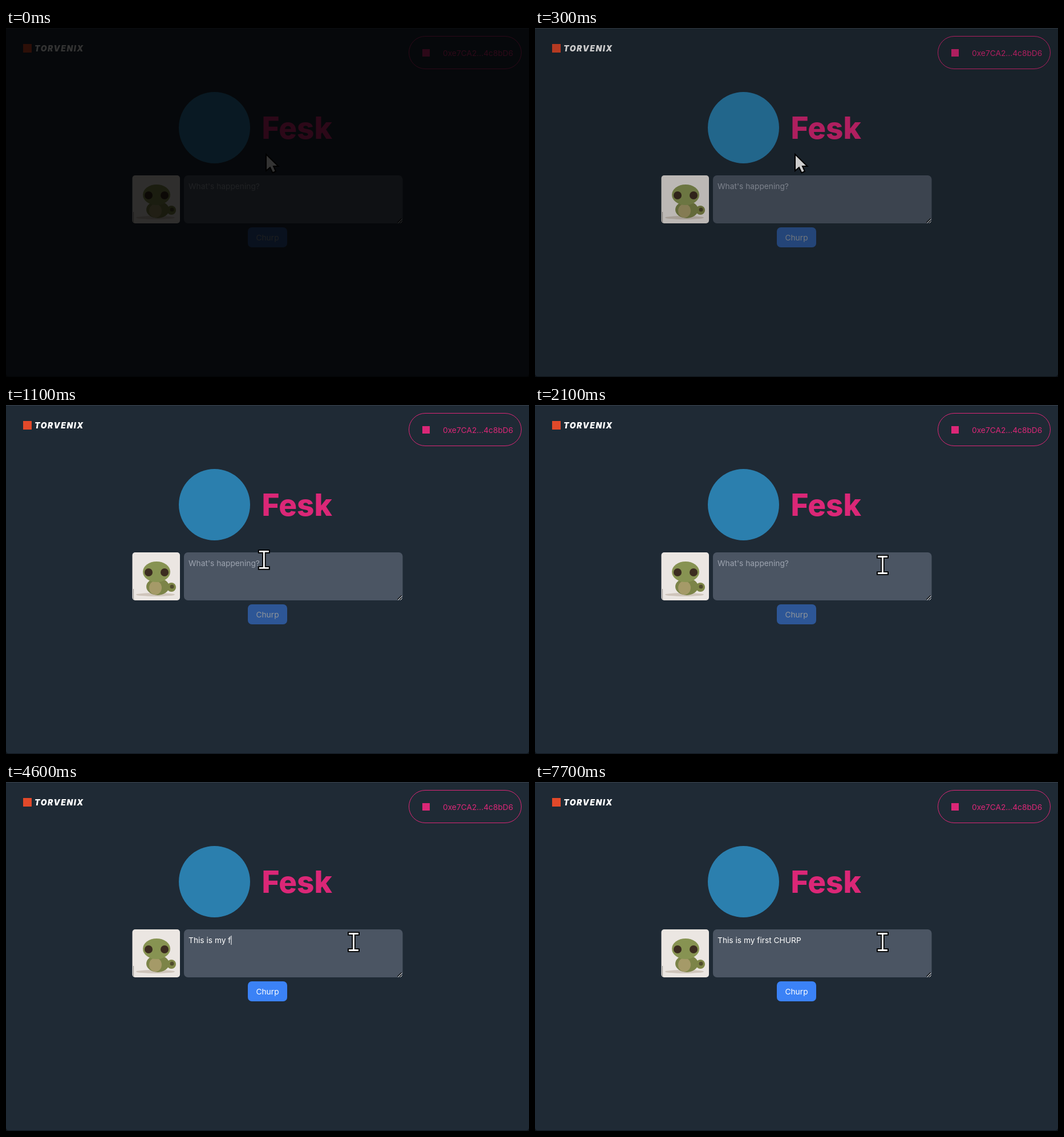
Write an HTML page that moves like this. It is 917 by 611 pixels and loops after 8000 ms.

```html
<!DOCTYPE html>
<html lang="en">
<head>
<meta charset="utf-8">
<title>Post composer</title>
<style>
  html, body { margin: 0; width: 100%; height: 100%; overflow: hidden; background: #000; }
  svg { display: block; width: 917px; height: 611px; font: 13.75px Inter, sans-serif; }
  text { white-space: pre; }
</style>
</head>
<body>
<svg viewBox="0 0 917 611">
  <rect width="917" height="611" fill="#0f151b"/>
  <path d="M0 0H917V605Q917 610 912 610H5Q0 610 0 605Z" fill="#1f2a35"/>
  <rect width="917" height="1" fill="#3b444e"/>

  <rect x="30" y="28" width="15" height="15" fill="#e2492a"/>
  <text x="50" y="41" fill="#fff" font-size="14" font-weight="900" font-style="italic" letter-spacing="1.5">TORVENIX</text>

  <rect x="706.5" y="14.5" width="197" height="57" rx="28.5" fill="none" stroke="#db2777"/>
  <rect x="730" y="37" width="13" height="13" fill="#db2777"/>
  <text x="766" y="48.5" fill="#db2777">0xe7CA2...4c8bD6</text>

  <circle cx="365.5" cy="174.5" r="62.5" fill="#2b7fae"/>
  <text x="448.5" y="193.5" fill="#db2777" font-size="53" font-weight="800">Fesk</text>

  <clipPath id="frame"><rect x="221.5" y="258" width="83.5" height="84" rx="5"/></clipPath>
  <g clip-path="url(#frame)">
    <rect x="221" y="258" width="85" height="85" fill="#ebe6e2"/>
    <ellipse cx="262" cy="332" rx="34" ry="3" fill="#cfc5bb"/>
    <circle cx="290" cy="319" r="8" fill="#7f8748"/>
    <circle cx="291" cy="318" r="3.5" fill="#4f4a2c"/>
    <ellipse cx="266" cy="318" rx="20" ry="15" fill="#7c8448"/>
    <ellipse cx="262" cy="320" rx="11" ry="12" fill="#a59a68"/>
    <ellipse cx="264" cy="292" rx="24" ry="18" fill="#879352"/>
    <circle cx="250" cy="293" r="7" fill="#3c2c20"/>
    <circle cx="278" cy="293" r="7" fill="#3c2c20"/>
    <rect x="223" y="322" width="1" height="18" fill="#8d8985"/>
  </g>

  <rect x="312" y="258" width="383.5" height="84" rx="7" fill="#4b5563"/>
  <path d="M687.5 341.5L694.5 334.5M691.5 341.5L694.5 338.5" stroke="#fff"/>
  <path d="M686.5 340.5L693.5 333.5M690.5 340.5L693.5 337.5" stroke="#111" stroke-width="1.2"/>
  <text id="hint" x="320" y="282" fill="#9ca3af">What's happening?</text>
  <text id="typed" x="320" y="282" fill="#fff"></text>
  <rect id="caret" y="269" width="1" height="16" fill="#fff"/>

  <g id="button">
    <rect x="424" y="349" width="69" height="35" rx="7" fill="#3b82f6"/>
    <text x="458.5" y="371.5" fill="#fff" text-anchor="middle">Churp</text>
  </g>

  <path id="arrow" d="M1 2V31L8 25L12.5 34.5L18 32L14 23H22.5Z" fill="#fff" stroke="#000" stroke-width="2"/>
  <g id="beam" fill="none">
    <path d="M-10.5 -14.5H10.5M-10.5 14.5H10.5M0 -15V15" stroke="#000" stroke-width="6.5"/>
    <path d="M-8.5 -14.5H8.5M-8.5 14.5H8.5M0 -15V15" stroke="#fff" stroke-width="2.8"/>
  </g>

  <rect id="shade" width="917" height="611"/>
</svg>
<script>
const [hint, typed, caret, button, arrow, beam, shade] =
  ['hint', 'typed', 'caret', 'button', 'arrow', 'beam', 'shade'].map(id => document.getElementById(id));

// All times are in ticks of 100 ms.
const LOOP = 80, CLICK = 16;
const MESSAGE = 'This is my first CHURP ';
const KEYS = [25, 26, 27, 29, 30, 34, 35, 40, 41, 42, 43, 45, 47, 49, 50, 52, 54, 63, 64, 65, 69, 70, 72];

const show = (el, on) => el.setAttribute('visibility', on ? 'visible' : 'hidden');
const ease = (tick, from, to) => {
  const k = Math.min(1, Math.max(0, (tick - from) / (to - from)));
  return k * k * (3 - 2 * k);
};

function drawPointer(tick) {
  const down = ease(tick, 7, 12), across = ease(tick, 17, 19);
  const x = 455 - 3 * down + 157.5 * across;
  const y = 219 + 58 * down + 3 * across;
  const overField = y > 258;
  for (const el of [arrow, beam]) el.setAttribute('transform', `translate(${x} ${y})`);
  show(arrow, !overField);
  show(beam, overField);
}

function drawField(tick) {
  const count = KEYS.filter(key => key <= tick).length;
  const last = count ? KEYS[count - 1] : CLICK;
  typed.textContent = MESSAGE.slice(0, count);
  caret.setAttribute('x', 320 + (count ? typed.getComputedTextLength() : 0));
  // The caret blinks every 500 ms, counted from the last input.
  show(caret, tick >= CLICK && (tick - last) % 10 < 5);
  show(hint, !count);
  button.setAttribute('opacity', count ? 1 : 0.5);
}

function draw(now) {
  const tick = Math.floor(now / 100) % LOOP;
  drawPointer(tick);
  drawField(tick);
  shade.setAttribute('opacity', Math.max(0, 0.8 - 0.2 * tick));
}

const start = performance.now();
function loop() {
  draw(performance.now() - start);
  requestAnimationFrame(loop);
}
loop();
</script>
</body>
</html>
```
